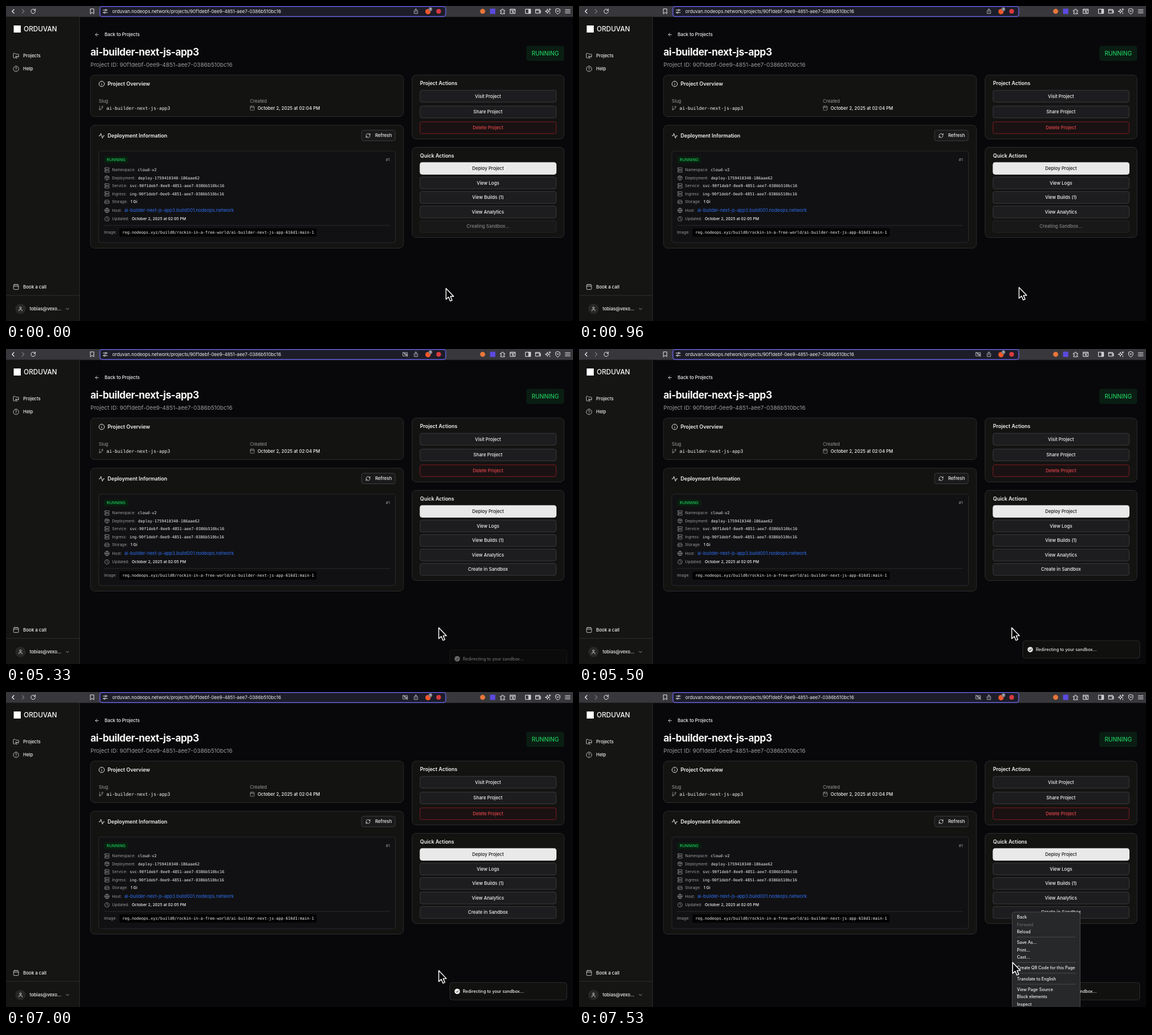
An HTML page for the animation above (8 s loop, 960 px wide and 534 px high).

```html
<!DOCTYPE html>
<html lang="en">
<head>
<meta charset="utf-8">
<title>Project dashboard</title>
<style>
html, body { margin: 0; height: 100%; overflow: hidden; background: #08080a; }
svg { display: block; width: 960px; height: 534px; font-family: Inter, sans-serif; }
.mono { font-family: "DejaVu Sans Mono", monospace; }
</style>
</head>
<body>
<svg id="stage" viewBox="0 0 960 534"></svg>
<script>
const WHITE = '#f4f4f4', GREY = '#9b9b9e', EDGE = '#2b2b2c', GREEN = '#1fc45c';

// Text is placed by the vertical centre of its capitals.
const text = (x, cy, size, str, fill = WHITE, weight = 500, attrs = '') =>
  `<text x="${x}" y="${cy + size * .36}" font-size="${size}" fill="${fill}" font-weight="${weight}" ${attrs}>${str}</text>`;
const mono = (x, cy, size, str) => text(x, cy, size, str, WHITE, 400, 'class="mono"');
const box = (x, y, w, h, r, fill, stroke = 'none', sw = 1) =>
  `<rect x="${x}" y="${y}" width="${w}" height="${h}" rx="${r}" fill="${fill}" stroke="${stroke}" stroke-width="${sw}"/>`;
const dot = (x, y, r, fill) => `<circle cx="${x}" cy="${y}" r="${r}" fill="${fill}"/>`;
const line = (x1, x2, y, stroke) => `<path d="M${x1} ${y}H${x2}" stroke="${stroke}"/>`;
const icon = (cx, cy, size, name, color = WHITE, weight = 2) =>
  `<path transform="translate(${cx - size / 2} ${cy - size / 2}) scale(${size / 24})" d="${icons[name]}"
    fill="none" stroke="${color}" stroke-width="${weight}" stroke-linecap="round" stroke-linejoin="round"/>`;
const button = (cy, label, fill = '#1d1d1f', stroke = '#39393c', color = WHITE) =>
  box(701, cy - 10, 230.5, 20, 3.5, fill, stroke) + text(816, cy, 7.7, label, color, 500, 'text-anchor="middle"');
const card = (x, y, w, h) => box(x, y, w, h, 7, '#131312', EDGE);

const ring = 'M12 2a10 10 0 1 0 0 20a10 10 0 1 0 0-20';
const slab = y => `M4 ${y}h16a2 2 0 0 1 2 2v4a2 2 0 0 1-2 2H4a2 2 0 0 1-2-2v-4a2 2 0 0 1 2-2zM6 ${y + 4}h.01`;
const icons = {
  left: 'm15 18-6-6 6-6', right: 'm9 18 6-6-6-6', down: 'm6 9 6 6 6-6',
  arrow: 'm12 19-7-7 7-7M19 12H5',
  reload: 'M20 12a8 8 0 1 1-2.5-5.8L20 8.5M20 3v5.5h-5.5',
  bookmark: 'M6 3h12v18l-6-5-6 5z',
  tune: 'M3 7h8M17 7h4M14 10a3 3 0 1 0 0-6a3 3 0 0 0 0 6M3 17h3M12 17h9M9 20a3 3 0 1 0 0-6a3 3 0 0 0 0 6',
  share: 'M8 9H5v12h14V9h-3M12 15V2M8 6l4-4 4 4',
  translate: 'M3 5h18v14H3zM2 3l20 18M8 9h5M10 9v5M15 15l2-5 2 5',
  puzzle: 'M4 8h5V6a2.5 2.5 0 0 1 5 0v2h5v5h-1a2.5 2.5 0 0 0 0 5h1v3H4v-4h1a2.5 2.5 0 0 0 0-5H4z',
  search: 'M3 4h18v16H3zM3 8h18M12 16a2.5 2.5 0 1 0 0-5a2.5 2.5 0 0 0 0 5M14 15l3 3',
  panel: 'M3 4h18v16H3zM14 4v16M16 5v14M18 5v14M20 5v14',
  wallet: 'M3 6v13h18V8H3V5h15v3M21 12h-5v3h5',
  sparkle: 'M10 4l2 6 6 2-6 2-2 6-2-6-6-2 6-2zM19 2v6M16 5h6M19 17v4',
  shield: 'M12 2l8 3v7c0 5-4 8-8 10-4-2-8-5-8-10V5zM9 9l3 5 3-5',
  menu: 'M3 6h18M3 12h18M3 18h18',
  folder: 'M9 20H4a2 2 0 0 1-2-2V5a2 2 0 0 1 2-2h4l3 3h9a2 2 0 0 1 2 2v4M12 13a2 2 0 1 0 .01 0M14 15h4M20 13a2 2 0 1 0 .01 0M12 17v4h4',
  help: ring + 'M9.1 9a3 3 0 0 1 5.8 1c0 2-3 3-3 3M12 17h.01',
  info: ring + 'M12 16v-4M12 8h.01',
  globe: ring + 'M2 12h20M12 2a15 15 0 0 1 0 20a15 15 0 0 1 0-20',
  clock: ring + 'M12 6v6l4 2',
  branch: 'M6 3v12M18 9a3 3 0 1 0 0-6a3 3 0 0 0 0 6M6 21a3 3 0 1 0 0-6a3 3 0 0 0 0 6M18 9a9 9 0 0 1-9 9',
  calendar: 'M8 2v4M16 2v4M5 4h14a2 2 0 0 1 2 2v14a2 2 0 0 1-2 2H5a2 2 0 0 1-2-2V6a2 2 0 0 1 2-2zM3 10h18',
  activity: 'M22 12h-4l-3 9L9 3l-3 9H2',
  refresh: 'M3 12a9 9 0 0 1 15-6.7L21 8M21 3v5h-5M21 12a9 9 0 0 1-15 6.7L3 16M3 21v-5h5',
  server: slab(2) + slab(14),
  cube: 'M12 2l9 5v10l-9 5-9-5V7zM3 7l9 5 9-5M12 22V12M7.5 4.3l9 5.1',
  drive: 'M22 12H2M5.5 5h13L22 12v6a2 2 0 0 1-2 2H4a2 2 0 0 1-2-2v-6zM6 16h.01M10 16h.01',
  user: 'M19 21v-2a4 4 0 0 0-4-4H9a4 4 0 0 0-4 4v2M12 11a4 4 0 1 0 0-8a4 4 0 0 0 0 8'
};

const id = '90f1debf-0ee9-4851-aee7-0386b510bc16';
const app = 'ai-builder-next-js-app3';

const toolbar = box(0, 0, 960, 18.5, 0, '#38383c') +
  box(159, .8, 585.5, 17, 4, '#1d1d29', '#625bd6', 1.5) +
  icon(12, 9, 13, 'left') + icon(29, 9, 13, 'right', '#77777b') + icon(46, 9, 11, 'reload') +
  icon(146, 9, 11, 'bookmark') + icon(168, 9, 10, 'tune') +
  text(180, 9, 7.75, `orduvan.nodeops.network/projects/${id}`, WHITE, 400) +
  icon(694, 9, 10, 'share', '#c8c8cc') +
  dot(714.5, 9.5, 4.5, '#f4562b') + dot(718.5, 5.5, 3.2, '#77777c') +
  text(718.5, 5.5, 5, '3', WHITE, 500, 'text-anchor="middle"') +
  dot(732.5, 9, 4, '#d83a3f') + dot(807, 9, 4.3, '#e8763a') + box(819.5, 4.5, 9, 9, 0, '#5b4ae0') +
  ['puzzle', 'search'].map((n, i) => icon(841 + 17 * i, 9, 11, n)).join('') +
  ['panel', 'wallet', 'sparkle', 'shield', 'menu'].map((n, i) => icon(884 + 16.75 * i, 9, 11, n)).join('');

const sidebar = box(0, 18.5, 124, 516, 0, '#151514') +
  `<path d="M124.5 18.5V534" stroke="${EDGE}"/>` +
  box(13, 33, 12, 12, 0, '#fff') + text(30, 39, 11.3, 'ORDUVAN', '#fff') +
  icon(17, 84.3, 11, 'folder', '#c4c4c4') + text(29, 84.3, 7.6, 'Projects') +
  icon(17, 106.5, 11, 'help', '#c4c4c4') + text(29, 106.5, 7.6, 'Help') +
  icon(17, 476, 11, 'calendar', '#c4c4c4') + text(29, 476, 7.6, 'Book a call') +
  line(0, 124, 490.5, EDGE) +
  dot(24.5, 513.5, 8.7, '#282827') + icon(24.5, 513.5, 9, 'user') +
  text(40, 513.5, 7.6, 'tobias@vexo...') + icon(104, 513.5, 9, 'down', '#c4c4c4');

const header = icon(154, 48.5, 9, 'arrow') + text(167, 48.5, 7.7, 'Back to Projects') +
  text(143, 78, 16.7, app, '#fafafa', 700, 'letter-spacing="-.025em"') +
  text(143, 100, 9.6, `Project ID: ${id}`, GREY, 400) +
  box(881, 67.5, 64, 25.5, 4, '#0a1d13') + text(913, 80.5, 9.9, 'RUNNING', GREEN, 500, 'text-anchor="middle"');

const overview = card(143, 117, 530, 70.5) +
  icon(162, 132, 11, 'info') + text(172, 132, 8.68, 'Project Overview', WHITE, 600) +
  text(157, 161.3, 7.65, 'Slug', GREY, 400) + icon(161, 173, 8.9, 'branch', GREY) + mono(170, 173, 7.8, app) +
  text(413, 161.3, 7.65, 'Created', GREY, 400) + icon(417, 173, 8.9, 'calendar', GREY) +
  text(426, 173, 7.6, 'October 2, 2025 at 02:04 PM');

const rows = [
  ['server', 278, 'Namespace', mono(223, 278, 6.66, 'cloud-v2')],
  ['cube', 291.5, 'Deployment', mono(223.5, 291.5, 6.66, 'deploy-1759410340-186aae62')],
  ['server', 305, 'Service', mono(209.5, 305, 6.66, 'svc-' + id)],
  ['server', 318.5, 'Ingress', mono(209, 318.5, 6.66, 'ing-' + id)],
  ['drive', 331.8, 'Storage', text(211, 331.8, 6.68, '1 Gi')],
  ['globe', 346.5, 'Host', text(200.5, 346.5, 7.78, app + '.build001.nodeops.network', '#2f6ff0', 400)],
  ['clock', 361, 'Updated', text(213, 361, 6.63, 'October 2, 2025 at 02:05 PM')]
];
const deployment = card(143, 202, 530, 208.5) +
  icon(162, 220, 11, 'activity') + text(172, 220, 8.68, 'Deployment Information', WHITE, 600) +
  box(602, 210.5, 57, 18, 3.5, '#1a1a1b', '#39393c') + icon(613, 219.7, 8.9, 'refresh') + text(625, 219.7, 7.67, 'Refresh') +
  box(157, 246, 502.5, 155, 4, '#111113', '#29292b') +
  box(166, 255, 41, 11.5, 2.5, '#08200f') + text(186.5, 261, 6.8, 'RUNNING', GREEN, 500, 'text-anchor="middle"') +
  text(650, 261, 6.68, '#1', GREY, 400, 'text-anchor="end"') +
  rows.map(([name, y, label, value]) => icon(171, y, 9, name, GREY) + text(179.5, y, 6.66, label + ':', GREY, 400) + value).join('') +
  line(166, 650, 372, EDGE) +
  text(166, 384, 6.65, 'Image:', GREY, 400) + box(192, 377, 334, 14, 2, '#030303') +
  mono(197, 384, 6.66, 'reg.nodeops.xyz/build0/rockin-in-a-free-world/ai-builder-next-js-app-616d1:main-1');

const actions = card(687.5, 117, 257.5, 108.5) + text(701, 131, 8.6, 'Project Actions', WHITE, 600) +
  button(153, 'Visit Project') + button(179.7, 'Share Project') +
  button(206.3, 'Delete Project', '#1a1112', '#7a1c20', '#e5484d') +
  card(687.5, 239.5, 257.5, 153) + text(701, 253.5, 8.6, 'Quick Actions', WHITE, 600) +
  button(275.3, 'Deploy Project', '#e9e9e9', '#e9e9e9', '#161616') +
  button(300, 'View Logs') + button(324.6, 'View Builds (1)') + button(349.2, 'View Analytics') +
  `<g id="busy" opacity=".5">${button(373.7, 'Creating Sandbox...')}</g>` +
  `<g id="ready">${button(373.7, 'Create in Sandbox')}${icon(676, 9, 10, 'translate', '#c8c8cc')}</g>`;

const toast = `<g id="toast">${box(751.5, 492.5, 198, 29.5, 4, '#111110', EDGE)}${dot(764, 507.5, 4.6, WHITE)}
  <path d="M762 507.6l1.5 1.5 2.7-3" fill="none" stroke="#111"/>
  ${text(773.5, 507.5, 7.2, 'Redirecting to your sandbox...')}</g>`;

const items = [[381.5, 'Back'], [394, 'Forward'], [406.3, 'Reload'], [424.7, 'Save As...'], [437, 'Print...'],
  [449.3, 'Cast...'], [467.5, 'Create QR Code for this Page'], [486, 'Translate to English'],
  [504.5, 'View Page Source'], [516.7, 'Block elements'], [529, 'Inspect']];
const menu = `<g id="menu">${box(733.5, 373, 115, 170, 4, '#27282a', '#48484a')}
  ${[415.5, 458.5, 476.8, 495.3].map(y => line(741.5, 840.5, y, '#48494b')).join('')}
  ${items.map(([y, s]) => text(741.5, y, 7.05, s, s === 'Forward' ? '#68686a' : WHITE)).join('')}</g>`;

const cursor = `<path id="cursor" d="M0 0V18.6L4.3 14.7 7.2 21.4 10.3 20.1 7.5 13.6H13z"
  fill="#000" stroke="#fff" stroke-width="1.4" stroke-linejoin="round"/>`;

const $ = name => document.getElementById(name);
$('stage').innerHTML = toolbar + sidebar + header + overview + deployment + actions + toast + menu + cursor;

// Cursor tip: time, x, y
const path = [[0, 745, 478.7], [480, 745, 478.7], [570, 740.7, 477.3], [700, 745.4, 476.3], [910, 745.4, 476.3],
  [960, 745, 477], [4710, 745, 477], [4860, 732.7, 472.5], [6980, 732.7, 472.5], [7260, 734.2, 458.5], [8000, 734.2, 458.5]];

function cursorAt(t) {
  const i = path.findIndex(p => p[0] > t), [t0, x0, y0] = path[i - 1], [t1, x1, y1] = path[i];
  const u = (t - t0) / (t1 - t0), k = u * u * (3 - 2 * u);
  return [x0 + (x1 - x0) * k, y0 + (y1 - y0) * k];
}

// CSS "ease", solved by bisection
function ease(x) {
  if (x <= 0 || x >= 1) return x <= 0 ? 0 : 1;
  const curve = (a, b, s) => 3 * a * s * (1 - s) ** 2 + 3 * b * s * s * (1 - s) + s ** 3;
  let lo = 0, hi = 1;
  for (let i = 0; i < 20; i++) {
    const mid = (lo + hi) / 2;
    if (curve(.25, .25, mid) < x) lo = mid; else hi = mid;
  }
  return curve(.1, 1, lo);
}

const show = (name, on) => $(name).style.display = on ? '' : 'none';

function draw(now) {
  const t = now % 8000, ready = t >= 5260, k = ease((t - 5230) / 400);
  show('busy', !ready);
  show('ready', ready);
  show('toast', ready);
  show('menu', t >= 7530);
  $('toast').setAttribute('transform', `translate(0 ${30 * (1 - k)})`);
  $('toast').setAttribute('opacity', k);
  $('cursor').setAttribute('transform', `translate(${cursorAt(t)})`);
}

const start = performance.now();
function tick() {
  draw(performance.now() - start);
  requestAnimationFrame(tick);
}
tick();
</script>
</body>
</html>
```
